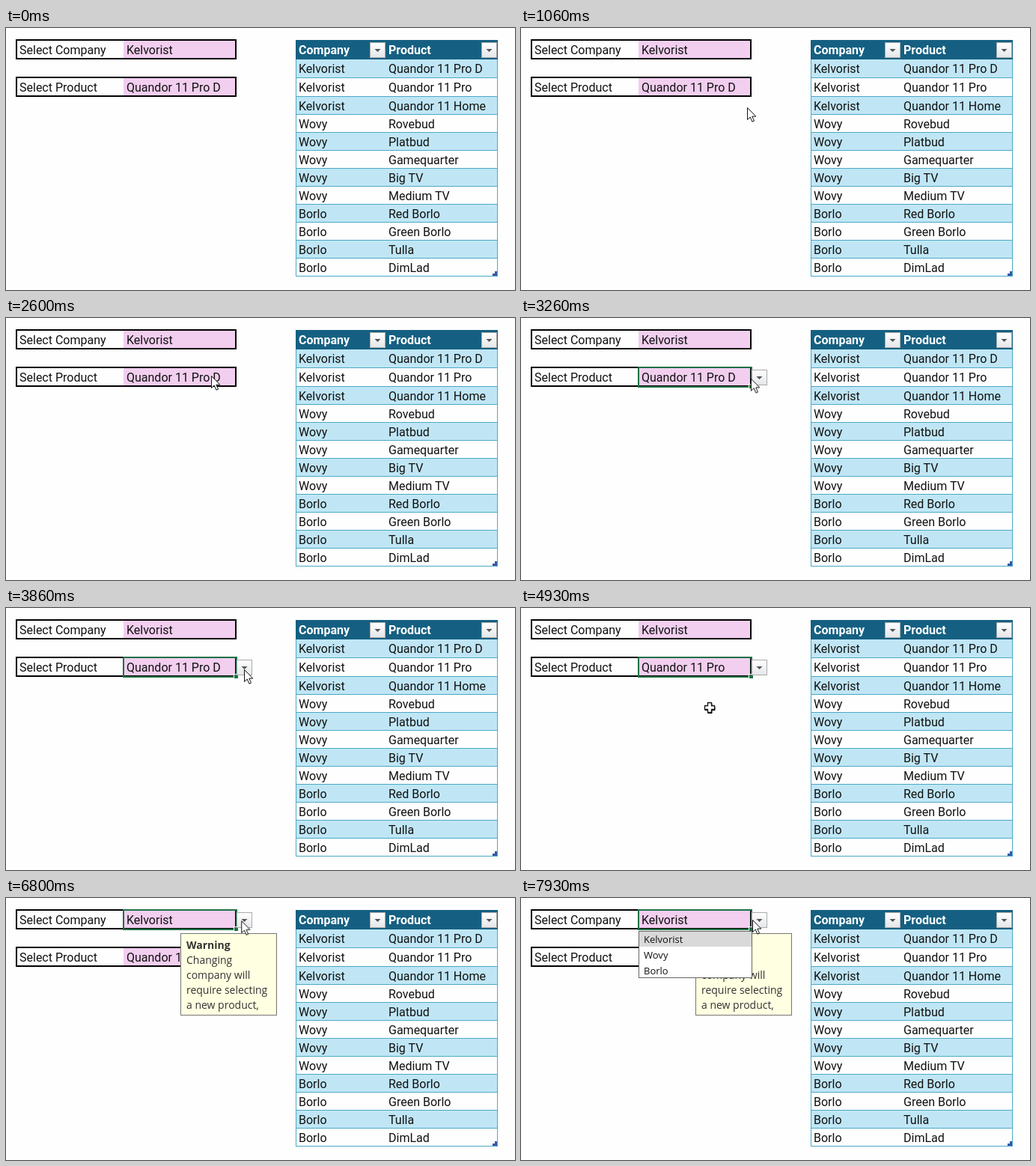
Recreate the animation shown at these times as an HTML page. Size 680 by 350 pixels, loop 8 s.

```html
<!DOCTYPE html>
<html lang="en">
<head>
<meta charset="utf-8">
<title>Dependent drop-down lists</title>
<style>
html, body { margin: 0; width: 100%; height: 100%; overflow: hidden; background: #fefefe; }
svg { display: block; width: 680px; height: 350px; }
text { font: 16px Roboto, "Noto Sans", sans-serif; fill: #111; white-space: pre; }
.head { font-weight: 700; fill: #fff; }
.item { font: 13px "Open Sans", "Noto Sans", sans-serif; }
.tip { font: 14px "Open Sans", "Noto Sans", sans-serif; fill: #333; }
.tip.title { font-weight: 700; }

.timed { animation: 8s step-end infinite; }
#firstChoice { animation-name: firstChoice; }
#secondChoice { animation-name: secondChoice; }
#productPick { animation-name: productPick; }
#productList { animation-name: productList; }
#companyPick { animation-name: companyPick; }
#companyList { animation-name: companyList; }
#hover { animation-name: hover; }
#arrow { animation-name: arrow; }
#cross { animation-name: cross; }
#pointer { animation: travel 8s ease-in-out infinite; }

@keyframes firstChoice { 0% { opacity: 1 } 57%, 100% { opacity: 0 } }
@keyframes secondChoice { 0% { opacity: 0 } 57%, 100% { opacity: 1 } }
@keyframes productPick { 0% { opacity: 0 } 36.6% { opacity: 1 } 79.1%, 100% { opacity: 0 } }
@keyframes productList { 0% { opacity: 0 } 50.8% { opacity: 1 } 57%, 100% { opacity: 0 } }
@keyframes companyPick { 0% { opacity: 0 } 79.1%, 100% { opacity: 1 } }
@keyframes companyList { 0% { opacity: 0 } 90%, 100% { opacity: 1 } }
@keyframes hover { 0% { transform: none } 53%, 100% { transform: translateY(21px) } }
@keyframes arrow {
  0% { opacity: 1 } 36.6% { opacity: 0 } 40.5% { opacity: 1 }
  57% { opacity: 0 } 84.5%, 100% { opacity: 1 }
}
@keyframes cross {
  0% { opacity: 0 } 36.6% { opacity: 1 } 40.5% { opacity: 0 }
  57% { opacity: 1 } 84.5%, 100% { opacity: 0 }
}
@keyframes travel {
  0%, 5% { transform: translate(330px, 354px) }
  11.6%, 17.5% { transform: translate(302px, 106px) }
  23.8% { transform: translate(260px, 22px) }
  28% { transform: translate(268px, 26px) }
  32.5%, 37.5% { transform: translate(274px, 77px) }
  42.5%, 51% { transform: translate(318px, 82px) }
  54.1% { transform: translate(262px, 120px) }
  57% { transform: translate(258px, 124px) }
  61.6% { transform: translate(252px, 133px) }
  66.6%, 69% { transform: translate(238px, 182px) }
  75.75% { transform: translate(277px, 50px) }
  78.5%, 80.6% { transform: translate(277px, 32px) }
  86.2%, 93% { transform: translate(318px, 30px) }
  98% { transform: translate(306px, 28px) }
  99.1%, 100% { transform: translate(309px, 29px) }
}
</style>
</head>
<body>
<svg viewBox="0 0 680 350">
  <defs>
    <linearGradient id="face" x2="0" y2="1">
      <stop stop-color="#fff"/><stop offset="1" stop-color="#e4e6e9"/>
    </linearGradient>
    <g id="button">
      <rect x=".5" y=".5" width="20" height="20" fill="url(#face)" stroke="#ababab"/>
      <path d="M6.5 9h8l-4 4z" fill="#555"/>
    </g>
    <g id="selection">
      <rect x="157" y="1" width="151" height="26" fill="none" stroke="#1e7145" stroke-width="2"/>
      <rect x="304" y="23" width="6" height="6" fill="#fff"/>
      <rect x="305" y="24" width="5" height="5" fill="#1e7145"/>
      <use href="#button" x="308" y="4"/>
    </g>
  </defs>

  <g id="table"></g>
  <g id="form"></g>

  <text id="firstChoice" class="timed" x="161" y="85">Quandor 11 Pro D</text>
  <text id="secondChoice" class="timed" x="161" y="85">Quandor 11 Pro</text>

  <g id="productPick" class="timed"><use href="#selection" y="65"/></g>
  <g id="productList" class="timed"></g>

  <g id="companyPick" class="timed">
    <use href="#selection" y="15"/>
    <rect x="233.5" y="47.5" width="128" height="109" fill="#ffffe1" stroke="#767676"/>
    <text class="tip title" x="241" y="68">Warning</text>
    <text class="tip" x="241" y="88">Changing</text>
    <text class="tip" x="241" y="108">company will</text>
    <text class="tip" x="241" y="128">require selecting</text>
    <text class="tip" x="241" y="148">a new product,</text>
  </g>
  <g id="companyList" class="timed"></g>

  <g id="pointer">
    <path id="arrow" class="timed" d="M.5.5v16l3.7-3.5 2.7 6.2 2.6-1.1-2.7-6h5z"
      fill="#fff" stroke="#111"/>
    <g id="cross" class="timed">
      <path d="M-2-5.5h5v4h4v5h-4v4h-5v-4h-4v-5h4z" fill="#111" stroke="#111"/>
      <path d="M-2.5-6.5h5v4h4v5h-4v4h-5v-4h-4v-5h4z" fill="#fff" stroke="#111" stroke-width="1.3"/>
    </g>
  </g>
</svg>
<script>
const catalog = {
  Kelvorist: ["Quandor 11 Pro D", "Quandor 11 Pro", "Quandor 11 Home"],
  Wovy: ["Rovebud", "Platbud", "Gamequarter", "Big TV", "Medium TV"],
  Borlo: ["Red Borlo", "Green Borlo", "Tulla", "DimLad"]
};
const companies = Object.keys(catalog);
const fill = (id, markup) => document.getElementById(id).innerHTML = markup;
const rect = (x, y, w, h, color, extra = "") =>
  `<rect x="${x}" y="${y}" width="${w}" height="${h}" fill="${color}" ${extra}/>`;
const label = (x, y, words, kind = "") => `<text class="${kind}" x="${x}" y="${y}">${words}</text>`;

function table() {
  const rows = companies.flatMap(name => catalog[name].map(product => [name, product]));
  const rowTop = i => i < 3 ? 42 + 25 * i : 116 + 24 * (i - 3);
  let out = rect(387, 16, 270, 26, "#156082")
    + label(391, 35, "Company", "head") + label(511, 35, "Product", "head")
    + '<use href="#button" x="486" y="19"/><use href="#button" x="635" y="19"/>';
  rows.forEach(([name, product], i) => {
    const top = rowTop(i), height = rowTop(i + 1) - top;
    out += rect(387, top, 270, height, i % 2 ? "#fefefe" : "#c0e6f5")
      + rect(387, top + height - 1, 270, 1, "#4ba9c6")
      + label(391, top + 18, name) + label(511, top + 18, product);
  });
  return out + rect(387, 42, 1, 290, "#4ba9c6") + rect(656, 42, 1, 290, "#4ba9c6")
    + '<path d="M656 325v6h-6v-3h3v-3z" fill="#3558a8"/>';
}

const field = (y, words) => rect(157, y, 151, 27, "#f2ceef")
  + rect(14, y + 1, 293, 25, "none", 'stroke="#000" stroke-width="2"')
  + label(18, y + 20, words);

function list(y, items, highlightId) {
  return rect(157.5, y + .5, 151, 62, "#fff", 'stroke="#666"')
    + rect(158, y + 1, 150, 20, "#d9d9d9", `id="${highlightId}" class="timed"`)
    + items.map((words, i) => label(164, y + 15.5 + 21 * i, words, "item")).join("");
}

fill("table", table());
fill("form", field(15, "Select Company") + field(65, "Select Product") + label(161, 35, companies[0]));
fill("productList", list(94, catalog[companies[0]], "hover"));
fill("companyList", list(44, companies, "current"));
</script>
</body>
</html>
```
